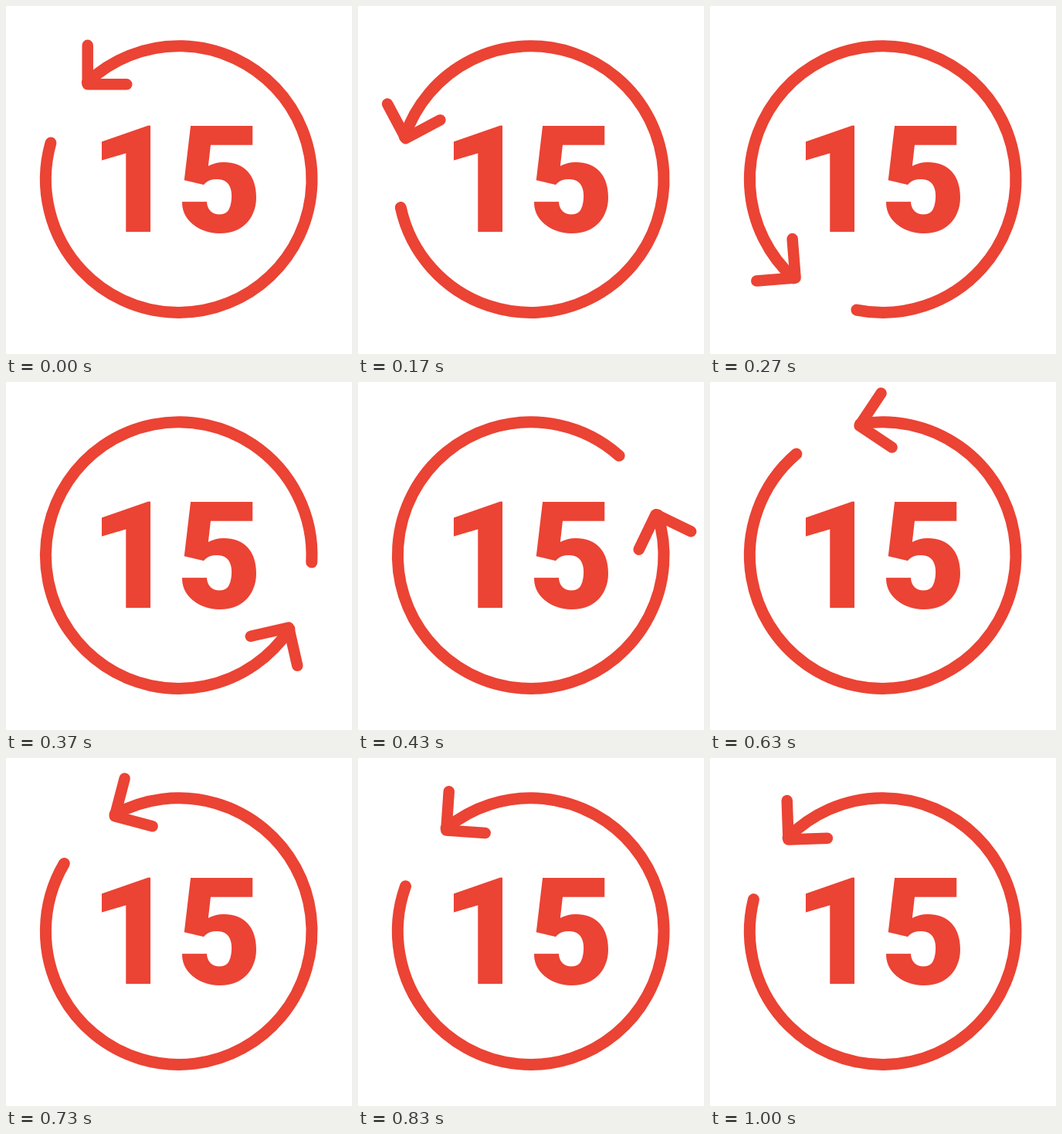
These frames come from a looping animation (448x450 px, 1.03 s). An HTML page with a canvas:

```html
<!DOCTYPE html>
<html lang="en">
<head>
<meta charset="utf-8">
<title>Rewind 15</title>
<style>
html, body { margin: 0; width: 100%; height: 100%; overflow: hidden; background: #fff; }
canvas { display: block; }
</style>
</head>
<body>
<canvas id="stage" width="448" height="450"></canvas>
<script>
const ctx = document.getElementById('stage').getContext('2d');
const COLOR = '#eb4334';
const LOOP = 1030, FPS = 30, LAST = 30;
const CX = 223.7, CY = 224.1, RADIUS = 172.3;
const TURN = 362;
const rad = deg => deg * Math.PI / 180;

// Cubic bezier (.42, 0, .19, 1), solved for x by bisection
function ease(x) {
  if (x <= 0) return 0;
  if (x >= 1) return 1;
  let lo = 0, hi = 1, s = 0.5;
  for (let i = 0; i < 30; i++) {
    s = (lo + hi) / 2;
    const u = 1 - s;
    const bx = 3 * s * u * u * 0.42 + 3 * s * s * u * 0.19 + s * s * s;
    if (bx < x) lo = s; else hi = s;
  }
  return s * s * (3 - 2 * s);
}

// Thirty steps a second, held on a 10 ms clock
function angleAt(ms) {
  const tick = Math.floor(ms / 10) * 10;
  const step = Math.min(LAST, Math.floor((tick + 5) * FPS / 1000));
  return -TURN * ease(step / LAST);
}

function digit(char, left) {
  const m = ctx.measureText(char);
  ctx.fillText(char, left + m.actualBoundingBoxLeft, 292);
}

function drawNumber() {
  ctx.font = '900 193px Roboto, sans-serif';
  ctx.textAlign = 'left';
  ctx.textBaseline = 'alphabetic';
  digit('1', 123.2);
  digit('5', 227.6);
}

function drawArrow(deg) {
  ctx.save();
  ctx.translate(CX, CY);
  ctx.rotate(rad(deg));

  ctx.lineWidth = 15;
  ctx.beginPath();
  ctx.arc(0, 0, RADIUS, rad(226.6), rad(555.85));
  ctx.stroke();

  ctx.lineWidth = 14.5;
  ctx.beginPath();
  ctx.moveTo(-118, -173.3);
  ctx.lineTo(-118, -122.8);
  ctx.lineTo(-67.5, -122.8);
  ctx.stroke();
  ctx.restore();
}

function render(ms) {
  ctx.fillStyle = '#fff';
  ctx.fillRect(0, 0, 448, 450);
  ctx.fillStyle = ctx.strokeStyle = COLOR;
  ctx.lineCap = ctx.lineJoin = 'round';
  drawNumber();
  drawArrow(angleAt(ms));
}

const start = performance.now();
function loop() {
  render((performance.now() - start) % LOOP);
  requestAnimationFrame(loop);
}
loop();
</script>
</body>
</html>
```
